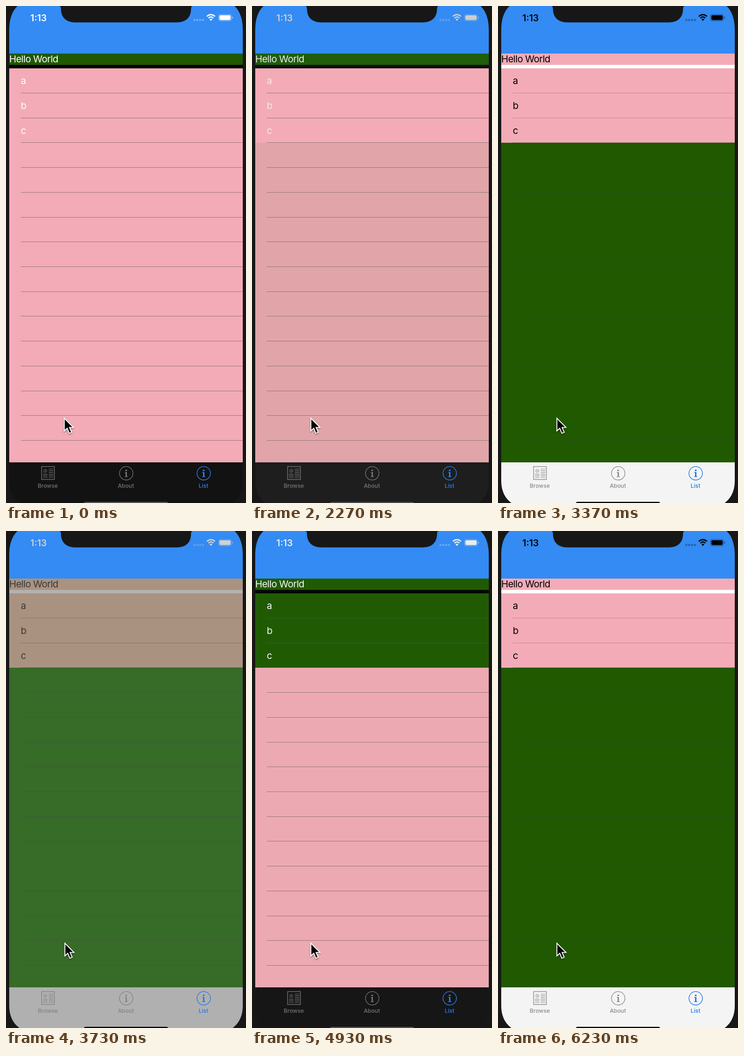
Recreate the animation shown at these times as an HTML page. Size 520x1076 px, loop 6.33 s.

```html
<!DOCTYPE html>
<html lang="en">
<head>
<meta charset="utf-8">
<title>Appearance switch</title>
<style>
  html, body { margin: 0; width: 100%; height: 100%; overflow: hidden; background: #171717; }
  svg { display: block; width: 100%; height: 100%; font-family: Inter, "Liberation Sans", sans-serif; }
  .body { font-size: 20.6px; letter-spacing: -.6px; fill: var(--text); }
  .tab { font-size: 12.1px; font-weight: 500; letter-spacing: .1px; text-anchor: middle; }
  .idle { color: var(--idle); }
  .active { color: var(--active); }
  .tab, .solid { fill: currentColor; }
  .line { fill: none; stroke: currentColor; stroke-width: 1.4; }
  #status { fill: var(--status); stroke: none; }
</style>
</head>
<body>
<svg viewBox="0 0 520 1076" preserveAspectRatio="none">
  <defs>
    <clipPath id="screen">
      <path d="M7 52C7 29 13 11 25 0H495C507 11 513 29 513 52V1028C513 1048 506 1065 491 1076H29C14 1065 7 1048 7 1028Z"/>
    </clipPath>
    <filter id="shadow" x="-50%" y="-50%" width="200%" height="200%">
      <feDropShadow dx="0" dy="2" stdDeviation="1.5" flood-opacity=".45"/>
    </filter>
    <g id="info">
      <circle class="line" r="14.6"/>
      <circle class="solid" cy="-6.4" r="1.9"/>
      <path class="solid" d="M-3.4 -2.6H1.5V6.8H3.5V8H-3.5V6.8H-1.4V-1.4H-3.4Z"/>
    </g>
  </defs>
  <rect width="520" height="1076" fill="#171717"/>
  <g clip-path="url(#screen)">
    <rect width="520" height="103" fill="#338bf3"/>
    <rect y="103" width="520" height="25" fill="var(--hello)"/>
    <rect y="127.5" width="520" height="8" fill="var(--gap)"/>
    <rect y="135" width="520" height="853" fill="var(--table)"/>
    <rect y="135" width="520" height="161" fill="var(--cell)"/>
    <g id="rules" fill="var(--rule)"></g>
    <text class="body" x="7" y="122">Hello World</text>
    <g id="rows"></g>

    <rect y="988" width="520" height="88" fill="var(--bar)"/>
    <g class="idle">
      <rect class="line" x="77.2" y="997.2" width="27.6" height="28"/>
      <text class="solid" x="85.2" y="1008.6" font-size="9.5" text-anchor="middle">@</text>
      <path class="line" style="stroke-width:1.2" d="M92.5 1002.5h10m-10 3.7h10m-10 3.7h10m-10 3.7h10m-10 3.7h10m-10 3.7h10M80 1013.6h10m-10 3.7h10m-10 3.7h10"/>
      <text class="tab" x="90.7" y="1043">Browse</text>
      <use href="#info" x="260.5" y="1011.7"/>
      <text class="tab" x="259.8" y="1043">About</text>
    </g>
    <g class="active">
      <use href="#info" x="428.4" y="1011.7"/>
      <text class="tab" x="428" y="1043">List</text>
    </g>
    <rect x="169" y="1073.5" width="182" height="6" rx="3" fill="var(--home)"/>
  </g>

  <path fill="#171717" d="M114 0Q119 0 119 5C119 25 130 35.5 151 35.5H369C390 35.5 401 25 401 5Q401 0 406 0Z"/>
  <g id="status">
    <text x="70.5" y="32.7" font-size="19.6" font-weight="600" text-anchor="middle">1:13</text>
    <g opacity=".28">
      <rect x="406" y="28" width="4.4" height="4.4" rx="1.2"/>
      <rect x="412.2" y="28" width="4.4" height="4.4" rx="1.2"/>
      <rect x="418.4" y="28" width="4.4" height="4.4" rx="1.2"/>
      <rect x="424.6" y="28" width="4.4" height="4.4" rx="1.2"/>
    </g>
    <path d="M444 32.3L440.7 28.9Q444 26.3 447.3 28.9Z"/>
    <path d="M438.6 26.2Q444 21.2 449.4 26.2M435 22.6Q444 14.8 453 22.6" fill="none" stroke="var(--status)" stroke-width="2.7"/>
    <rect x="460.5" y="18.2" width="28" height="14" rx="4" fill="none" stroke="var(--status)" stroke-opacity=".45" stroke-width="1.1"/>
    <rect x="462.3" y="20" width="24.4" height="10.4" rx="2.3"/>
    <path d="M490 22.8Q492 23.5 492 25.2T490 27.6Z" opacity=".5"/>
  </g>

  <path id="cursor" d="M0 0V27.2L6.2 21.6L10.8 32.4L15.8 30.2L11.2 19.8H19.6Z" fill="#000" stroke="#fff" stroke-width="1.9" filter="url(#shadow)"/>
</svg>
<script>
const LOOP = 6330, FADE = 400;
const PINK = [243, 171, 183], GREEN = [2, 89, 0];
// start time and the appearance faded to (1 = light)
const SWITCHES = [[2214, 1], [3585, 0], [4898, 1]];
const ROWS_FOLLOW = 3000;

const $ = id => document.getElementById(id);
const root = document.documentElement.style;
const clamp = x => Math.min(1, Math.max(0, x));
const lerp = (a, b, k) => a + (b - a) * k;
const smooth = x => { x = clamp(x); return x * x * (3 - 2 * x); };
const rgb = c => `rgb(${c.map(Math.round).join(",")})`;
const grey = (a, b, k) => rgb(Array(3).fill(lerp(a, b, k)));
const mix = (a, b, k) => a.map((v, i) => lerp(v, b[i], k));
// the green lies outside the display gamut, so its red channel is clipped
const tint = pinkness => {
  const c = mix(GREEN, PINK, pinkness);
  return rgb([Math.max(32, c[0]), c[1], c[2]]);
};

$("rules").innerHTML = Array.from({ length: 15 }, (_, i) =>
  `<rect x="32" y="${Math.round(188 + i * 53.71)}" width="481" height="1"/>`).join("");
$("rows").innerHTML = ["a", "b", "c"].map((s, i) =>
  `<text class="body" x="32" y="${169 + i * 53.8}">${s}</text>`).join("");

function lightness(t, speed) {
  let value = 0;
  for (const [start, to] of SWITCHES) value = lerp(value, to, smooth((t - start) / FADE * speed));
  return value;
}

function draw(t) {
  const light = lightness(t, 1);
  const ahead = light + .4 * light * (1 - light);
  const rule = mix([84, 84, 88], [60, 60, 67], light);
  const colors = {
    hello: tint(light),
    cell: tint(t < ROWS_FOLLOW ? 1 : light),
    table: tint(1 - ahead),
    gap: grey(0, 255, light),
    text: grey(255, 0, ahead),
    bar: grey(18, 244, light),
    idle: grey(117, 138, light),
    active: rgb(mix([46, 130, 245], [28, 115, 232], light)),
    home: grey(84, 0, clamp(light * 2)),
    status: grey(255, 0, lightness(t, 2)),
    rule: `rgba(${rule.join(",")},${lerp(.6, .29, light)})`
  };
  for (const name in colors) root.setProperty("--" + name, colors[name]);
  const x = lerp(126.3, 127.6, smooth(t / 200));
  $("cursor").setAttribute("transform", `translate(${x} 892.6)`);
}

const began = performance.now();
function tick() {
  draw((performance.now() - began) % LOOP);
  requestAnimationFrame(tick);
}
tick();
</script>
</body>
</html>
```
